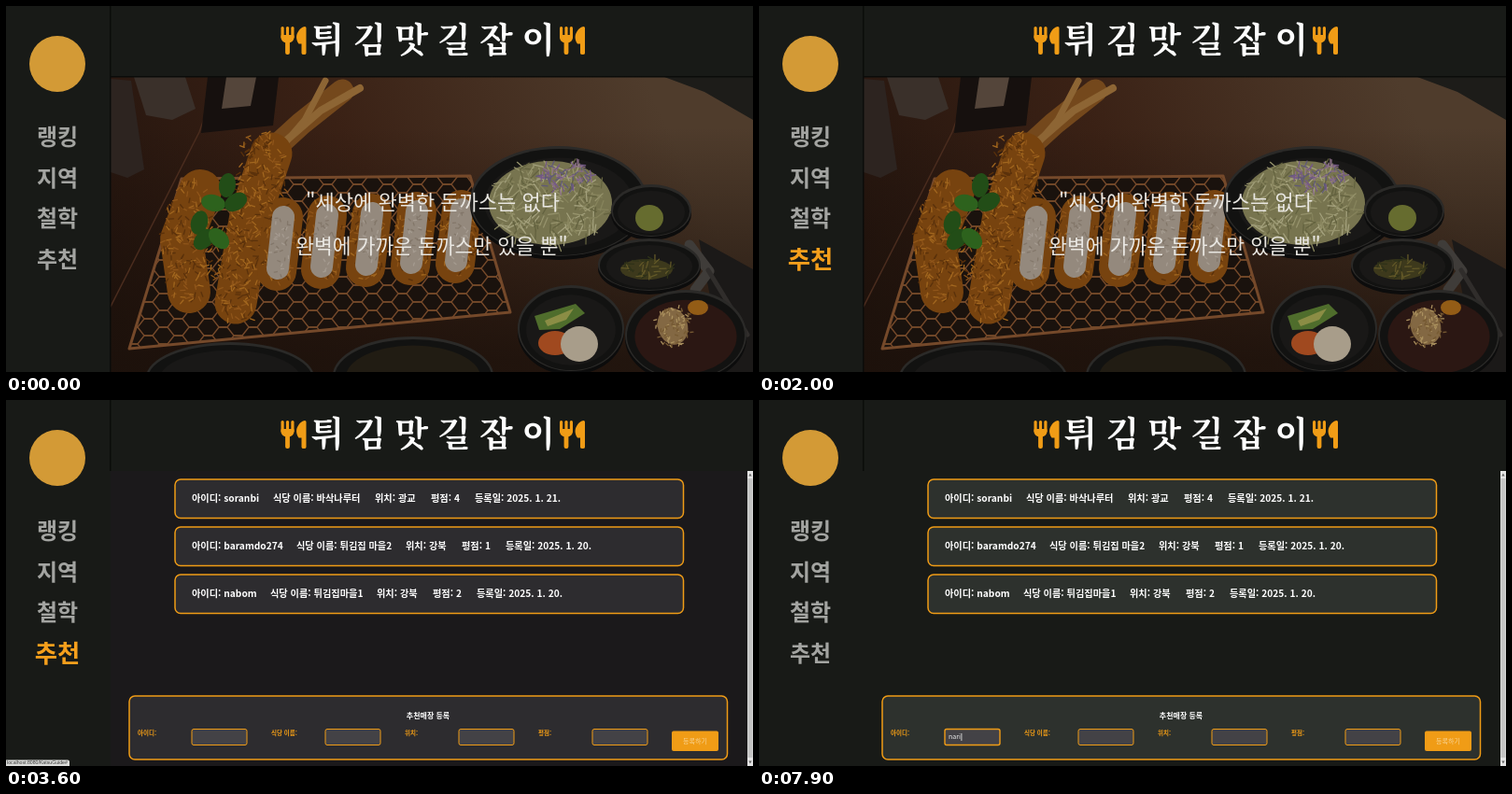
Animation of 800 by 392 pixels, one loop 8 s. Source, as an HTML page with a canvas:

```html
<!DOCTYPE html>
<html lang="ko">
<head>
<meta charset="utf-8">
<title>튀김맛길잡이</title>
<style>
  html, body { margin: 0; width: 100%; height: 100%; overflow: hidden; background: #181a17; }
  #stage { position: relative; width: 800px; height: 392px; overflow: hidden;
    font-family: 'Noto Sans CJK KR', 'Noto Sans KR', 'Noto Sans CJK', sans-serif; }
  canvas { position: absolute; left: 0; top: 0; width: 800px; height: 392px; }
  span { position: absolute; line-height: 1; white-space: pre; transform: translateY(-57%); }
  span.mid { transform: translate(-50%, -57%); }
  .title { font-family: 'Noto Serif CJK KR', 'Noto Serif KR', 'Noto Sans CJK KR', serif; }
  .quote { font-family: 'Nanum Pen Script', 'Noto Sans CJK KR', sans-serif; }
  .url { font-family: 'Liberation Sans', Arial, sans-serif; }
</style>
</head>
<body>
<div id="stage"><canvas id="view"></canvas></div>
<script>
const LOOP = 8000;
const SLIDE_AT = 2577, SLIDE_MS = 600, PAGE_AT = 3400, TINT_END = 3800;
const HOVER = [1900, 4000], STATUS = [2100, 4250], FOCUS_AT = 4800;
const TYPING = [
  [FOCUS_AT, ''], [5000, 'ㅏ'], [5700, 'ㅏㅑ'], [6200, 'ㅏㅑㅡ'], [6700, 'ㅏㅑ'], [6900, 'ㅏ'],
  [7100, ''], [7600, 'n'], [7700, 'na'], [7800, 'nar'], [7900, 'nari']
];
const ORANGE = '#f09c16', DARK = '#181a17';
const CARD_Y = [85, 136, 187], INPUT_X = [199, 342, 485, 628];

const stage = document.getElementById('stage');
const view = document.getElementById('view');
const dpr = window.devicePixelRatio || 1;

function setup(canvas, w, h) {
  canvas.width = Math.round(w * dpr);
  canvas.height = Math.round(h * dpr);
  const c = canvas.getContext('2d');
  c.scale(dpr, dpr);
  return c;
}

// ---- text ----
function label(parent, text, x, y, size, color, weight = 700, cls = '') {
  const el = document.createElement('span');
  el.textContent = text;
  el.className = cls;
  Object.assign(el.style, {
    left: x + 'px', top: y + 'px', fontSize: size + 'px', color, fontWeight: weight
  });
  parent.appendChild(el);
  return el;
}

function group() {
  return stage.appendChild(document.createElement('div'));
}

const chrome = group(), home = group(), list = group();

[...'튀김맛길잡이'].forEach((ch, i) =>
  label(chrome, ch, 344 + i * 45.2, 37, 37, '#fff', 700, 'mid title'));

const menu = ['랭킹', '지역', '철학', '추천'].map((text, i) =>
  label(chrome, text, 55, 141 + i * 43.6, 24, '#a3a4a1', 700, 'mid'));
const active = menu[3];

label(home, '"세상에 완벽한 돈까스는 없다', 457, 210, 22, '#e9e7e2', 400, 'mid quote');
label(home, '완벽에 가까운 돈까스만 있을 뿐"', 456, 257, 21.5, '#e9e7e2', 400, 'mid quote');

const FIELDS = ['아이디', '식당 이름', '위치', '평점', '등록일'];
const ROWS = [
  { x: [199, 286, 395, 455, 502], v: ['soranbi', '바삭나루터', '광교', '4', '2025. 1. 21.'] },
  { x: [199, 311, 428, 488, 535], v: ['baramdo274', '튀김집 마을2', '강북', '1', '2025. 1. 20.'] },
  { x: [199, 283, 397, 457, 504], v: ['nabom', '튀김집마을1', '강북', '2', '2025. 1. 20.'] }
];
ROWS.forEach((row, r) => row.v.forEach((value, i) =>
  label(list, FIELDS[i] + ': ' + value, row.x[i], CARD_Y[r] + 21, 10.2, '#fff')));

label(list, '추천매장 등록', 452, 339, 8, '#fff', 700, 'mid');
FIELDS.slice(0, 4).forEach((name, i) =>
  label(list, name + ':', 141 + i * 143, 357, 6.5, ORANGE));
label(list, '등록하기', 738, 365.5, 7, '#f8d596', 400, 'mid');
const typed = label(list, '', 203, 361, 7, '#eee', 400);
const status = label(chrome, 'localhost:8080/KatsuGuide#', 1, 389, 5.2, '#333', 400, 'url');

// ---- photo strip: two slides side by side ----
function rng(seed) {
  return () => (seed = (seed * 16807) % 2147483647) / 2147483647;
}

function oval(c, x, y, rx, ry, fill, rot = 0) {
  c.beginPath();
  c.ellipse(x, y, rx, ry, rot, 0, 7);
  c.fillStyle = fill;
  c.fill();
}

function poly(c, pts, fill) {
  c.beginPath();
  for (let i = 0; i < pts.length; i += 2) c.lineTo(pts[i], pts[i + 1]);
  c.closePath();
  if (fill) { c.fillStyle = fill; c.fill(); }
}

function stroke(c, pts, width, color) {
  c.beginPath();
  for (let i = 0; i < pts.length; i += 2) c.lineTo(pts[i], pts[i + 1]);
  c.lineWidth = width;
  c.strokeStyle = color;
  c.lineCap = c.lineJoin = 'round';
  c.stroke();
}

function bowl(c, x, y, rx, ry, inside = '#191817') {
  oval(c, x, y + 4, rx, ry, '#0c0c0c');
  oval(c, x, y, rx, ry, '#2b2a28');
  oval(c, x, y + 1, rx - 2, ry - 2, '#121211');
  oval(c, x, y + 2, rx * .84, ry * .82, inside);
}

// scatter short strokes inside an ellipse
function crumbs(c, x, y, rx, ry, n, len, colors, seed) {
  const rand = rng(seed);
  for (let i = 0; i < n; i++) {
    const a = rand() * 6.283, d = Math.sqrt(rand()), b = rand() * 6.283;
    const px = x + Math.cos(a) * rx * d, py = y + Math.sin(a) * ry * d;
    stroke(c, [px, py, px + Math.cos(b) * len, py + Math.sin(b) * len], 1.3, colors[i % colors.length]);
  }
}

// honeycomb wire: neighbouring rows mirror each other and share flat edges
function basket(c, pts, color) {
  const xs = pts.filter((_, i) => i % 2 === 0), ys = pts.filter((_, i) => i % 2);
  const x0 = Math.min(...xs), x1 = Math.max(...xs), y1 = Math.max(...ys), step = 9;
  c.save();
  poly(c, pts, '#1a120d');
  c.clip();
  for (let y = Math.min(...ys), row = 0; y < y1; y += step, row++) {
    const a = row % 2 ? step : 0, b = step - a, line = [];
    for (let x = x0; x <= x1; x += 32) line.push(x, y + a, x + 9, y + a, x + 16, y + b, x + 25, y + b);
    stroke(c, line, 1.3, color);
  }
  c.restore();
  stroke(c, [...pts, pts[0], pts[1]], 3, color);
}

const CRUST = '#77430f', FRY = ['#8f551a', '#5a310b', '#a2671f'];

function firstSlide(c) {
  const wood = c.createLinearGradient(112, 360, 690, 90);
  wood.addColorStop(0, '#21130d');
  wood.addColorStop(.5, '#3a2115');
  wood.addColorStop(1, '#4f3c2c');
  c.fillStyle = wood;
  c.fillRect(112, 76, 688, 316);
  const shade = c.createLinearGradient(0, 130, 0, 380);
  shade.addColorStop(0, '#1c110b00');
  shade.addColorStop(1, '#1c110bdd');
  c.fillStyle = shade;
  c.fillRect(112, 76, 688, 316);
  poly(c, [705, 76, 800, 76, 800, 122, 748, 92], '#1d1c19');
  poly(c, [742, 250, 800, 282, 800, 392, 770, 392], '#1b1918');
  stroke(c, [228, 76, 207, 135, 112, 322], 1.5, '#4a2c1e');

  poly(c, [112, 78, 134, 80, 148, 175, 130, 184, 112, 178], '#2d2420');
  poly(c, [137, 76, 192, 76, 203, 110, 178, 122, 150, 117], '#3a302a');
  poly(c, [216, 76, 292, 76, 286, 128, 209, 136], '#16100e');
  poly(c, [236, 76, 268, 76, 262, 107, 231, 110], '#54453a');

  basket(c, [188, 185, 497, 182, 540, 328, 132, 367], '#75492a');

  stroke(c, [208, 198, 188, 250, 196, 306], 46, CRUST);
  crumbs(c, 196, 255, 28, 68, 190, 5, FRY, 11);
  stroke(c, [360, 91, 316, 126, 281, 158], 25, '#74481c');
  stroke(c, [379, 88, 337, 112, 299, 145], 8, '#8d6534');
  stroke(c, [342, 80, 320, 122, 296, 150], 7, '#8d6534');
  stroke(c, [284, 158, 262, 224, 246, 318], 45, CRUST);
  crumbs(c, 273, 190, 28, 56, 180, 5, FRY, 23);
  crumbs(c, 250, 280, 26, 62, 180, 5, FRY, 37);

  [293, 340, 388, 436, 484].forEach((x, i) => {
    const y = 254 - i * 2;
    stroke(c, [x + 4, y - 28, x - 3, y + 30], 42, CRUST);
    crumbs(c, x, y, 20, 46, 90, 4, FRY, 51 + i);
    stroke(c, [x + 4, y - 28, x - 2, y + 27], 24, '#94897d');
    crumbs(c, x + 1, y, 10, 34, 30, 3, ['#a59b90', '#83776a'], 61 + i);
  });

  for (const [x, y] of [[237, 192], [222, 211], [246, 210], [207, 232], [212, 250], [228, 249]])
    oval(c, x, y, 13, 9, y % 2 ? '#2d621d' : '#224d17', x * .1);

  bowl(c, 592, 209, 95, 59);
  oval(c, 583, 211, 66, 45, '#77744f');
  crumbs(c, 583, 211, 62, 44, 240, 11, ['#96936c', '#86835c', '#63623f', '#a3a07c'], 71);
  crumbs(c, 599, 182, 29, 15, 75, 6, ['#755a87', '#8b6f88', '#605978'], 83);

  bowl(c, 691, 219, 43, 28);
  oval(c, 689, 227, 15, 14, '#666c2f');
  stroke(c, [732, 256, 753, 284, 738, 304], 11, '#3f3c39');
  stroke(c, [752, 283, 794, 352], 5, '#302d2b');
  bowl(c, 689, 277, 55, 28);
  oval(c, 686, 282, 28, 11, '#3d391c');
  crumbs(c, 686, 281, 26, 10, 35, 7, ['#625828', '#2f3219'], 91);

  bowl(c, 605, 345, 57, 46);
  oval(c, 588, 361, 18, 13, '#a0491f');
  oval(c, 614, 362, 20, 19, '#a89d8a');
  poly(c, [566, 332, 610, 319, 620, 329, 593, 346, 571, 347], '#4f6d2c');
  poly(c, [577, 337, 608, 324, 600, 336, 580, 343], '#8b8d45');
  bowl(c, 728, 352, 65, 48, '#2b1713');
  oval(c, 741, 323, 11, 8, '#935c16');
  oval(c, 714, 343, 16, 20, '#836843', -.3);
  crumbs(c, 715, 343, 20, 23, 80, 3, ['#ab915f', '#765a33'], 101);

  bowl(c, 240, 398, 90, 38);
  bowl(c, 436, 396, 86, 42, '#211c13');
}

function secondSlide(c) {
  c.fillStyle = '#1e1712';
  c.fillRect(417, 76, 688, 316);
  bowl(c, 552, 78, 74, 49);
  oval(c, 552, 82, 62, 35, '#7b7a74');
  crumbs(c, 552, 84, 56, 28, 140, 3, ['#92918a', '#6a6963'], 113);
  bowl(c, 672, 107, 53, 30);
  oval(c, 676, 106, 30, 15, '#7f5722');
  oval(c, 650, 109, 17, 12, '#475c27');
  basket(c, [690, 68, 1105, 68, 1105, 102, 715, 96], '#5d3d23');

  basket(c, [470, 161, 1050, 152, 1140, 345, 380, 345], '#75522f');
  const cuts = [[592, 182], [668, 176], [731, 203], [545, 236], [650, 238],
    [820, 186], [885, 228], [790, 256]];
  cuts.forEach(([x, y], i) => {
    oval(c, x, y + 9, 41, 41, CRUST);
    crumbs(c, x, y + 9, 38, 38, 170, 4, FRY, 131 + i);
    oval(c, x + 1, y - 2, 27, 21, '#93685a');
    crumbs(c, x + 1, y - 2, 23, 17, 40, 4, ['#a67766', '#825548'], 151 + i);
    oval(c, x + 2, y, 11, 8, '#86493a');
  });
  stroke(c, [417, 352, 1105, 352], 3, '#5d3d26');
  bowl(c, 551, 393, 66, 35);
  oval(c, 551, 393, 37, 16, '#77726a');
  oval(c, 728, 383, 94, 62, '#5f4424');
  oval(c, 728, 386, 88, 56, '#231b13');
  oval(c, 730, 393, 74, 45, '#5a4320');
  bowl(c, 945, 390, 78, 40);
}

const strip = document.createElement('canvas');
const sc = setup(strip, 1376, 316);
for (const [from, dx, paint] of [[0, -112, firstSlide], [688, 271, secondSlide]]) {
  sc.save();
  sc.beginPath();
  sc.rect(from, 0, 688, 316);
  sc.clip();
  sc.translate(dx, -76);
  paint(sc);
  sc.restore();
}

// ---- interface ----
const ctx = setup(view, 800, 392);

function panel(x, y, w, h, r, fill, border, width = 1.5) {
  ctx.beginPath();
  ctx.roundRect(x, y, w, h, r);
  ctx.fillStyle = fill;
  ctx.fill();
  if (!border) return;
  ctx.lineWidth = width;
  ctx.strokeStyle = border;
  ctx.stroke();
}

function utensils(x, y) {
  for (const dx of [0, 5.4, 10.8]) panel(x + dx, y, 3.2, 13, 1.5, ORANGE);
  panel(x, y + 9, 14, 8.5, [1, 1, 6, 6], ORANGE);
  panel(x + 4.6, y + 15, 4.8, 15, 2, ORANGE);
  ctx.beginPath();
  ctx.moveTo(x + 27, y + 1.5);
  ctx.quadraticCurveTo(x + 27, y, x + 25.5, y);
  ctx.bezierCurveTo(x + 21, y + .5, x + 12.5, y + 9, x + 19, y + 18.5);
  ctx.lineTo(x + 22, y + 18.5);
  ctx.lineTo(x + 22, y + 28.5);
  ctx.quadraticCurveTo(x + 22, y + 30, x + 24.5, y + 30);
  ctx.quadraticCurveTo(x + 27, y + 30, x + 27, y + 28.5);
  ctx.fill();
}

function drawHome(t) {
  const p = Math.min(1, Math.max(0, (t - SLIDE_AT) / SLIDE_MS));
  const shift = 688 * p * p * (3 - 2 * p);
  ctx.save();
  ctx.beginPath();
  ctx.rect(112, 76, 688, 316);
  ctx.clip();
  ctx.drawImage(strip, 112 - shift, 76, 1376, 316);
  ctx.restore();
}

function drawList(t) {
  const tinted = t < TINT_END;
  const fill = tinted ? '#2d2c2f' : '#2d312d';
  if (tinted) {
    ctx.fillStyle = '#1b191b';
    ctx.fillRect(112, 76, 688, 316);
  }
  for (const y of CARD_Y) panel(181, y, 544.5, 41.5, 6, fill, ORANGE);
  panel(132, 317, 640.5, 68, 6, fill, ORANGE);
  INPUT_X.forEach((x, i) =>
    panel(x, 352.5, 59, 17, 2, '#434246', ORANGE, i === 0 && t >= FOCUS_AT ? 1.4 : 1));
  panel(713, 354.5, 50, 21.5, 2, ORANGE);

  panel(794, 76, 6, 316, 0, '#e4e4e4');
  panel(794.5, 84, 5, 299, 0, '#c3c3c3');
  poly(ctx, [795.3, 81.5, 798.7, 81.5, 797, 78.5], '#666');
  poly(ctx, [795.3, 386.5, 798.7, 386.5, 797, 389.5], '#666');

  const step = TYPING.filter(s => s[0] <= t).pop();
  const text = step ? step[1] : '';
  if (typed.textContent !== text) typed.textContent = text;
  if (step && (t - step[0]) % 1060 < 530) {
    ctx.fillStyle = '#eee';
    ctx.fillRect(203.5 + typed.offsetWidth, 357, .8, 8);
  }
}

const within = (t, [a, b]) => t >= a && t < b;
const show = (el, on) => { el.style.visibility = on ? 'visible' : 'hidden'; };

function draw(t) {
  const onHome = t < PAGE_AT, hover = within(t, HOVER), hint = within(t, STATUS);
  ctx.fillStyle = DARK;
  ctx.fillRect(0, 0, 800, 392);
  if (onHome) drawHome(t); else drawList(t);

  ctx.fillStyle = '#0b0c0a';
  ctx.fillRect(111, 0, 1.5, onHome ? 392 : 76);
  if (onHome) ctx.fillRect(112, 75, 688, 1.5);
  utensils(294.5, 22);
  utensils(593, 22);
  oval(ctx, 55, 62, 30, 30, '#d39a36');
  if (hint) panel(0, 385.5, 68, 7, [0, 2, 0, 0], '#dcdddb');

  show(home, onHome);
  show(list, !onHome);
  show(status, hint);
  active.style.color = hover ? '#f59f1c' : '#a3a4a1';
  active.style.fontSize = (hover ? 26.4 : 24) + 'px';
}

const start = performance.now();
function tick() {
  draw((performance.now() - start) % LOOP);
  requestAnimationFrame(tick);
}
tick();
</script>
</body>
</html>
```
